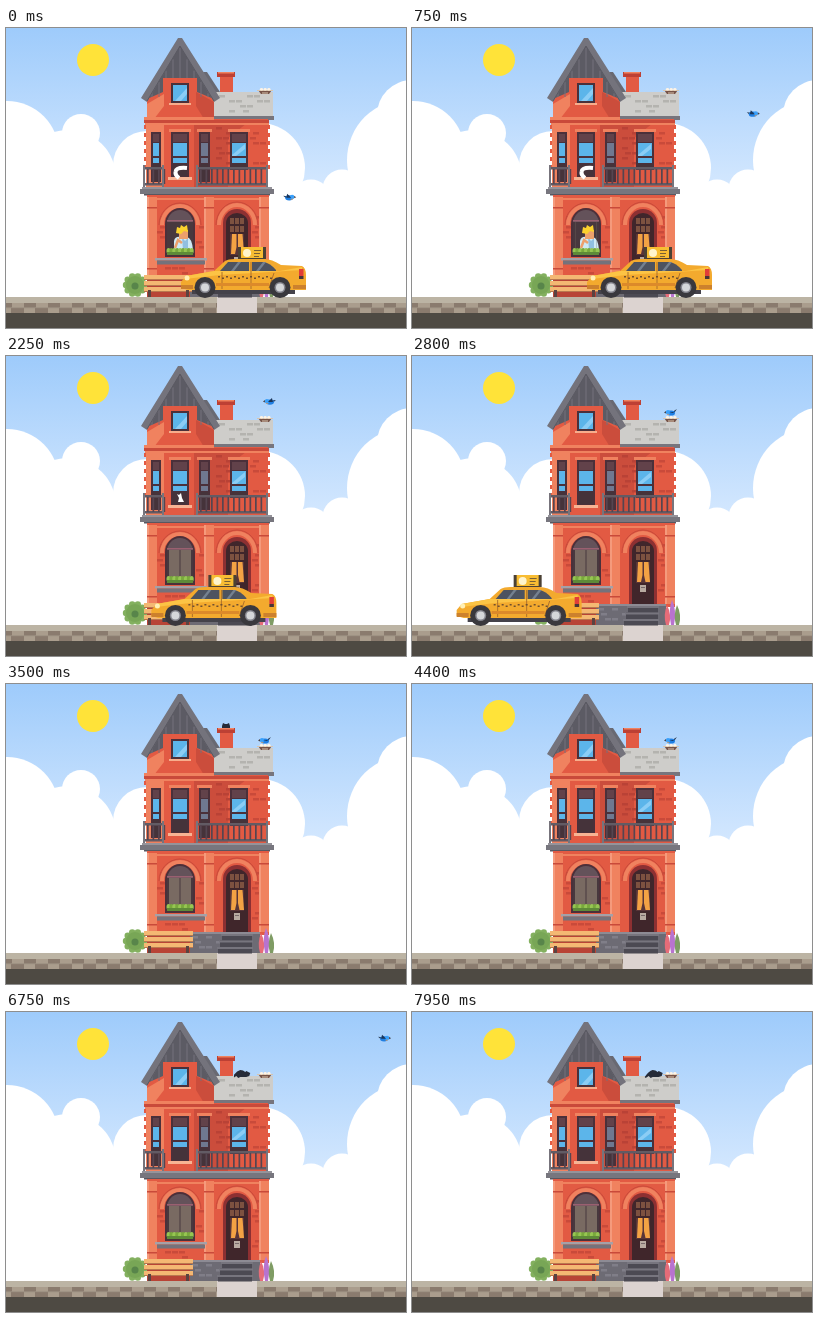
An HTML page with a canvas that plays this animation: 400 by 300 pixels, repeating every 8000 ms.

```html
<!DOCTYPE html>
<html lang="en">
<head>
<meta charset="utf-8">
<title>Brick house</title>
<style>
html, body { margin: 0; width: 100%; height: 100%; overflow: hidden; }
canvas { display: block; width: 400px; height: 300px; }
</style>
</head>
<body>
<canvas id="stage" width="400" height="300"></canvas>
<script>
const LOOP = 8000;
const ctx = document.getElementById('stage').getContext('2d');
const WALL = '#e25a43', LIGHT = '#f0825f', BRICK = '#c94a3a', SHADE = '#cb4d3c';
const FRAME = '#4b303a', GLASS = '#5cb5ea', SLATE = '#696972', INK = '#262b38';

const rect = (color, x, y, w, h) => { ctx.fillStyle = color; ctx.fillRect(x, y, w, h); };
const path = (color, d) => { ctx.fillStyle = color; ctx.fill(new Path2D(d)); };
const line = (color, width, d) => {
  ctx.strokeStyle = color; ctx.lineWidth = width; ctx.stroke(new Path2D(d));
};
const disc = (color, x, y, r, ry = r) => {
  ctx.fillStyle = color;
  ctx.beginPath();
  ctx.ellipse(x, y, r, ry, 0, 0, 7);
  ctx.fill();
};
const repeat = (n, draw) => { for (let i = 0; i < n; i++) draw(i); };
const ramp = (t, from, to) => Math.min(1, Math.max(0, (t - from) / (to - from)));
const smooth = k => k * k * (3 - 2 * k);
const bezier = (u, a, b, c, d) => {
  const v = 1 - u;
  return v * v * v * a + 3 * v * v * u * b + 3 * v * u * u * c + u * u * u * d;
};

function scoped(draw, clip, x = 0, y = 0) {
  ctx.save();
  if (clip) ctx.clip(new Path2D(clip));
  ctx.translate(x, y);
  draw();
  ctx.restore();
}

// Scatters bricks on a course grid; the seed fixes the pattern.
function bricks(x, y, columns, rows, seed, color = BRICK) {
  repeat(columns * rows, i => {
    const column = i % columns, row = Math.floor(i / columns);
    const random = Math.sin((i + 1) * 12.99 + seed * 78.23) * 43758.5;
    if (random - Math.floor(random) < 0.38) {
      rect(color, x + column * 7 + row % 2 * 3, y + row * 5, 6, 2.5);
    }
  });
}

function drawSky() {
  const sky = ctx.createLinearGradient(0, 0, 0, 190);
  sky.addColorStop(0, '#9ecbfb');
  sky.addColorStop(1, '#deedff');
  rect(sky, 0, 0, 400, 300);
  disc('#ffe339', 87, 32, 16);
  const cloud = (x, y, r) => disc('#fff', x, y, r);
  cloud(1, 125, 52);
  cloud(75, 105, 19);
  cloud(62, 150, 48);
  cloud(141, 137, 34);
  cloud(254, 140, 45);
  repeat(2, i => cloud(305 + i * 31, 171 - i * 10, 19.5));
  cloud(402, 132, 61);
  cloud(406, 87, 35);
  rect('#fff', 0, 165, 400, 110);
  rect('#fff', 95, 145, 60, 25);
}

function drawStreet() {
  rect('#bcb4a4', 0, 269, 400, 6);
  rect('#aa9d8d', 0, 275, 400, 10);
  repeat(18, i => {
    rect('#8a7b6e', i * 24 - 6, 275, 12, 4.5);
    rect('#8a7b6e', i * 24 + 5, 280, 13, 5);
  });
  rect('#968a7c', 0, 279.5, 400, 0.7);
  rect('#4e4a43', 0, 285, 400, 15);
  rect('#dcd3d0', 211, 269, 40, 16);
}

function drawSash(x, w, h, glass = GLASS) {
  rect(LIGHT, x - 2, 101, w + 4, 3);
  rect(FRAME, x, 104, w, h);
  rect('#62424a', x + 2, 106, w - 4, 8);
  rect(glass, x + 2, 115, w - 4, 20);
  rect(FRAME, x + 1, 128, w - 2, 2);
  rect('#45333a', x + 2, 136, w - 4, h - 33);
}

function drawRoof() {
  path(SLATE, 'M197 44H201L214 64V75L207 72Z');
  path('#cecdca', 'M206 64H267V88H208L202 72Z');
  bricks(213, 67, 7, 4, 3, '#b4b3af');
  rect('#77757d', 207, 88, 61, 4);
  rect(WALL, 214, 47, 13, 17);
  bricks(214, 52, 1, 3, 5);
  rect('#bd4034', 211, 44, 18, 5);
  rect(LIGHT, 212, 44, 16, 1.5);

  path(WALL, 'M141 72L174 27L208 72V91H141Z');
  path(LIGHT, 'M141 76L158 66V78L148 91H141Z');
  path(SHADE, 'M190 64L208 74V91H198L190 78Z');
  path('#5c5b64', 'M174 16L208 71L191 64V50H157V64L141 71Z');
  repeat(9, i => {
    const x = 146 + i * 7;
    line('#74737c', 1, `M${x} ${20 + Math.abs(x - 174) * 1.62}V${x > 156 && x < 193 ? 50 : 69}`);
  });
  path('#74737c', 'M172 10H176L214 70L208 74L174 18L141 74L135 70Z');
  line('#5a5962', 1, 'M141 73L174 18L208 73');
  rect(FRAME, 165, 55, 18, 20);
  rect(GLASS, 167, 57, 14, 16);
  path('#8bcdf5', 'M169 73L181 60V66L175 73Z');
  rect('#f7ad8c', 163, 75, 22, 2);
}

function drawUpperFloor() {
  rect(WALL, 140, 91, 122, 70);
  repeat(6, i => {
    rect(WALL, 138, 97 + i * 8, 3, 4);
    rect(WALL, 261, 97 + i * 8, 3, 4);
  });
  rect(LIGHT, 140, 97, 18, 64);
  rect(SHADE, 188, 97, 20, 64);
  path(SHADE, 'M208 92H245L222 110V161H208Z');
  bricks(210, 99, 2, 8, 2, '#b94236');
  bricks(244, 99, 2, 8, 8);
  rect(LIGHT, 138, 89, 70, 3);
  rect(BRICK, 138, 92, 125, 3);
  rect(LIGHT, 139, 95, 124, 2);
  drawSash(145, 10, 50);
  drawSash(165, 18, 45);
  drawSash(193, 11, 50, '#6f7890');
  drawSash(224, 18, 38);
  path('#8bcdf5', 'M226 127L239 116V121L230 128H226Z');
  rect('#f7b494', 162, 149, 24, 3);
}

function drawBalcony() {
  const railing = (from, to) => {
    rect('#625b64', from, 139, to - from, 2.5);
    rect('#625b64', from, 155, to - from, 2.5);
    for (let x = from + 4; x < to; x += 5.5) rect('#564550', x, 141, 1.7, 15);
    rect('#77747c', from, 137, 2, 23);
    rect('#77747c', to - 2, 137, 2, 23);
  };
  railing(137, 158);
  railing(190, 262);
  rect('#95939a', 136, 159, 130, 2);
  rect('#77767e', 134, 161, 134, 5);
  rect('#595760', 138, 166, 126, 1.5);
}

function drawArch(x, rise) {
  line(LIGHT, 4, `M${x - 18} 197A18 ${rise} 0 0 1 ${x + 18} 197`);
  line(BRICK, 1, `M${x - 21} 197A21 ${rise + 3} 0 0 1 ${x + 21} 197`);
}

function drawGroundFloor() {
  rect(WALL, 141, 167, 122, 84);
  rect(LIGHT, 141, 170, 122, 2);
  bricks(151, 183, 1, 8, 4);
  bricks(190, 183, 1, 8, 6);
  bricks(246, 183, 1, 11, 1);
  bricks(152, 239, 6, 2, 7);
  [141, 198, 253].forEach(x => {
    rect(LIGHT, x, 169, 10, 79);
    rect('#f59a7c', x, 169, 2, 79);
    rect(BRICK, x, 179, 10, 1.5);
    rect(BRICK, x, 240, 10, 1.5);
  });
  drawArch(174, 19);
  drawArch(231, 20);
  path('#8d3032', 'M217 250V195A14 14 0 0 1 245 195V250Z');
  path('#40262b', 'M220 248V195A11 10 0 0 1 242 195V248Z');
  repeat(6, i => rect('#7d5140', 224 + i % 3 * 5, 190 + (i / 3 | 0) * 8, 4, 6));
  rect('#593538', 224, 206, 14, 21);
  path('#f3a244', 'M226 206H230.5V219L229 226H225Z');
  path('#f3a244', 'M232 206H236.5L238 226H233.5L232 219Z');
  rect('#b8aaa1', 228, 229, 6, 7);
  rect('#77696a', 229, 231, 4, 1);
}

function drawYard() {
  rect('#b84436', 141, 247, 44, 22);
  rect('#6d6b74', 184, 248, 70, 21);
  bricks(186, 252, 4, 3, 9, '#807e88');
  rect('#8d8b94', 184, 248, 70, 2);
  repeat(3, i => {
    rect('#4c4a53', 216 - i * 2, 250 + i * 6.5, 30 + i * 2, 6.5);
    rect('#77757e', 215 - i * 2, 250 + i * 6.5, 32 + i * 2, 2);
  });
  repeat(10, i => {
    const a = i * Math.PI / 5;
    disc('#83b05f', 129 + 9 * Math.cos(a), 257 + 9 * Math.sin(a), 3.2);
  });
  disc('#78a656', 129, 257, 9);
  disc('#58854a', 129, 258, 3.5);
  ['#e66c78', '#b873cf', '#7f9c64'].forEach((color, i) => {
    const x = 255 + i * 5, y = 249 - i % 2 * 5;
    path(color, `M${x - 1} 269Q${x - 4} ${y + 10} ${x} ${y}Q${x + 5} ${y + 10} ${x + 2} 269Z`);
  });
  repeat(3, i => {
    rect('#f4b873', 138, 247 + i * 6, 49, 4);
    rect('#b9784f', 138, 251 + i * 6, 49, 1);
  });
  rect('#5a4341', 142, 262, 3, 7);
  rect('#5a4341', 180, 262, 3, 7);
}

function drawParlour(t) {
  path(FRAME, 'M159 229V196A15 16 0 0 1 189 196V229Z');
  path('#64525a', 'M161 227V196A13 14 0 0 1 187 196V227Z');
  rect('#48383e', 161, 194, 26, 28);
  if (t < 1200) {
    path('#cfe9f5', 'M168 222V213Q169 208 175 209H181Q186 210 187 222Z');
    path('#91bfe0', 'M176 209L179 213L182 210V222H177Z');
    rect('#eda06c', 173, 202, 9, 9);
    path('#fbd12e', 'M170 205L171 199L174 200L175 197L178 199L181 197L182 204L178 203L175 206Z');
    line('#eda06c', 2.5, 'M169 220L172 212L176 215');
  }
  const width = 10.5 * smooth(ramp(t, 700, 1200));
  rect('#796a62', 163, 194, width, 28);
  rect('#796a62', 185 - width, 194, width, 28);
  rect('#9a6070', 161, 192, 26, 1.5);
  repeat(9, i => disc(i % 2 ? '#79a93c' : '#96c652', 162.5 + i * 2.9, 223, 2, 3));
  rect('#5e8a38', 161, 224, 26, 3);
  rect('#a4a1a8', 149, 230, 52, 2.5);
  rect('#74727b', 151, 232.5, 48, 4);
}

function drawWhiteCat(t) {
  if (t < 1900) {
    const sway = Math.sin(t / 240);
    line('#fff', 4, `M181 ${140 + sway * 0.4}Q170 139 169.5 144Q169 147 ${173 + sway * 0.5} 150`);
    return;
  }
  scoped(() => path('#fff', 'M171 138L173 139L175 137L176 142L178 146H172L173 142Z'),
    'M167 134H181V148H167Z', 12 * ramp(t, 2300, 2550));
}

function drawBlackCat(t) {
  const peek = Math.min(ramp(t, 3200, 3450), 1 - ramp(t, 3850, 4050));
  scoped(() => path(INK, 'M216 45V42L217 39L219 40H221L223 39L224 42V45Z'),
    'M210 30H232V44H210Z', 0, (1 - peek) * 7);
  const x = 238 + 12 * ramp(t, 4300, LOOP) ** 2 - 14 * (1 - ramp(t, 4300, 5000));
  scoped(() => path(INK,
    'M-17 3Q-13 -3 -9 -4Q-6 -4 -4 -2L-3 -3L-1 -2L1 -1L0 2L-3 3H-9L-11 4L-13 2L-16 4Z'),
    'M228 52H262V70H228Z', x, 62);
}

function drawNest() {
  path('#765348', 'M252 62H266L263 66H255Z');
  line('#d9c4ad', 1, 'M251 62.5H267M256 65H262');
  repeat(3, i => disc('#fff4e5', 255.5 + i * 3.7, 61.3, 1.6, 1.2));
}

// Climbs in an arc to the nest, rests, then sails off to the right.
function birdAt(t) {
  if (t < 4650) {
    const u = ramp(t, 0, 2500);
    return [bezier(u, 283, 425, 261, 259), bezier(u, 170, 55, 11.5, 57)];
  }
  const u = (t - 4650) / 2100;
  return [259 + 119 * u, 57 - 34 * smooth(ramp(u, 0.25, 1.2))];
}

function drawBird(t) {
  const [x, y] = birdAt(t);
  const perched = t > 2500 && t < 4650;
  const wing = perched ? -1 : -4 * Math.cos(t * Math.PI / 125);
  scoped(() => {
    if (t > 850 && t < 4650) ctx.scale(-1, 1);
    path('#24364f', `M-6 ${perched ? -4 : -2}L-2 -1.5L-2 1.5Z`);
    disc('#1f7fe3', 0, 0, 4, 2.6);
    disc('#39a0fb', 3, -0.8, 2.2);
    path('#e89b55', 'M1 2Q4 2 4 0.5Z');
    path('#45434d', 'M5 -2L7 -0.5L5 0.5Z');
    path('#1d3557', `M-3 0L2 0L-2 ${wing}Z`);
  }, null, x, y);
}

function drawWheel(x) {
  disc('#39383d', x, 259.5, 10.5);
  disc('#85868f', x, 259.5, 5.5);
  disc('#d5d7da', x, 259.5, 4);
}

function drawTaxi(t) {
  const seconds = Math.max(0, t - 1750) / 1000;
  scoped(() => {
    rect('#44424a', 186, 261, 103, 5);
    path('#f3aa2e', 'M175 254L180 248L208 243L219 233Q222 231 229 231H258Q266 231 275 237L296 238Q300 240 300 247V262H182L175 260Z');
    path('#fcc445', 'M180 248L208 243H274L296 239V242L214 247L179 251Z');
    path('#4d5360', 'M214 243L222 234H243V243Z');
    path('#4d5360', 'M246 234H258Q264 235 270 242V243H246Z');
    path('#758190', 'M225 243L232 234H235L228 243Z');
    path('#758190', 'M250 243L257 234H260L253 243Z');
    line('#ae712b', 1, 'M216 244V261M245 234V261M268 245L263 260');
    rect('#dc8a2a', 210, 255, 53, 3);
    repeat(14, i => rect('#70502f', 212 + i * 4, 248 + i % 2 * 1.5, 2, 1.5));
    disc('#fff0b5', 181, 250, 2.5);
    rect('#e13d38', 293, 241, 4.5, 7);
    rect('#4a3438', 293, 248, 4.5, 3);
    rect('#cc812d', 175, 257, 12, 4);
    rect('#cc812d', 287, 257, 13, 4);
    drawWheel(199);
    drawWheel(274);
    rect('#4b4134', 232, 219, 28, 12);
    rect('#f8bd33', 235, 219, 22, 11);
    disc('#fff4cd', 241, 225, 4);
    repeat(3, i => rect('#796035', 248, 222 + i * 3, 7 - i, 1));
  }, null, -118 * seconds ** 2);
}

function frame(t) {
  drawSky();
  drawStreet();
  drawRoof();
  drawUpperFloor();
  drawBalcony();
  drawGroundFloor();
  drawYard();
  drawParlour(t);
  drawWhiteCat(t);
  drawBlackCat(t);
  drawBird(t);
  drawNest();
  drawTaxi(t);
}

const start = performance.now();
function tick() {
  frame((performance.now() - start) % LOOP);
  requestAnimationFrame(tick);
}
tick();
</script>
</body>
</html>
```
